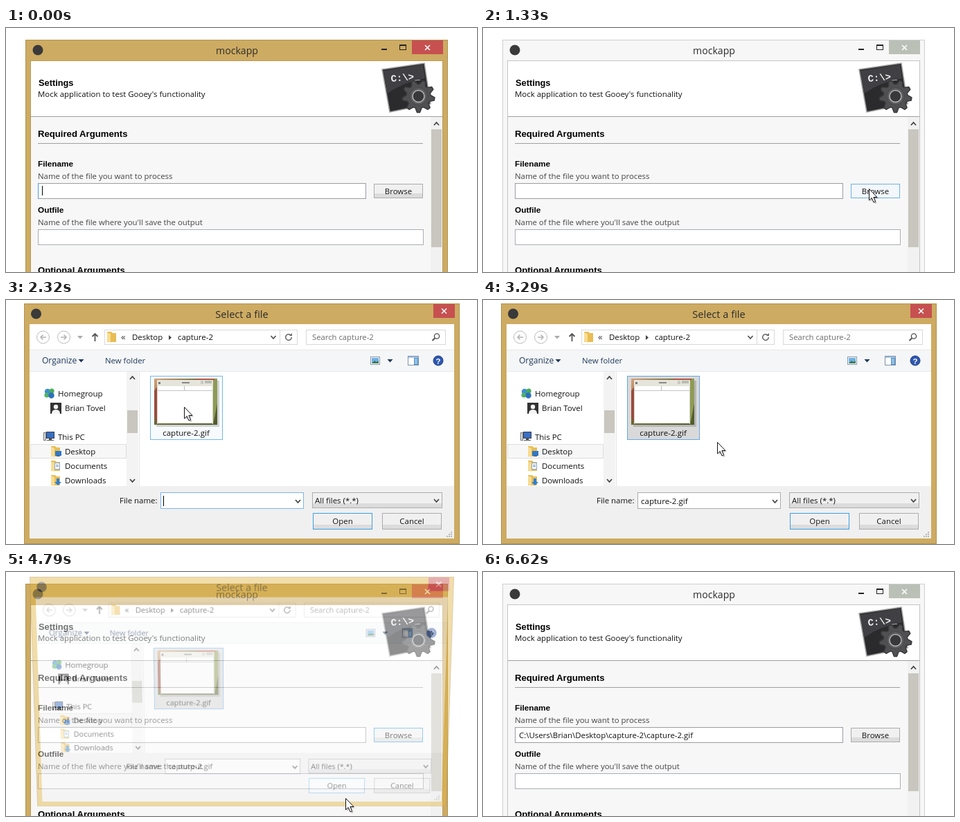
Animation of 680 by 354 pixels, one loop 6750 ms. Source, as an HTML page:

```html
<!DOCTYPE html>
<html lang="en">
<head>
<meta charset="utf-8">
<title>File chooser demo</title>
<style>
html, body { margin: 0; width: 100%; height: 100%; overflow: hidden; background: #fff; }
svg { position: absolute; left: 0; top: 0; width: 680px; height: 354px; overflow: hidden; }
text { font-family: "Open Sans", "Noto Sans", sans-serif; white-space: pre; }
.b { font-family: "Liberation Sans", Arial, sans-serif; font-weight: 700; }
.m { font-family: "Liberation Mono", monospace; font-weight: 700; }
#dialog { transform-origin: 340.5px 0; }
</style>
</head>
<body>
<svg id="app" viewBox="0 0 680 354"></svg>
<svg id="dialog" viewBox="0 0 680 354"></svg>
<svg id="top" viewBox="0 0 680 354"></svg>
<script>
const LOOP = 6750;
const GOLD = [205, 171, 98], FLASH = [224, 182, 69];
const $ = id => document.getElementById(id);

// ---- drawing helpers ----
const fill = (x, y, w, h, c, id = '') =>
  `<rect ${id && `id="${id}"`} x="${x}" y="${y}" width="${w}" height="${h}" fill="${c}"/>`;
const box = (x, y, w, h, c, line, id = '') =>
  `<rect ${id && `id="${id}"`} x="${x + .5}" y="${y + .5}" width="${w - 1}" height="${h - 1}" fill="${c}" stroke="${line}"/>`;
const label = (x, y, s, size = 11.45, more = 'fill="#111"') =>
  `<text x="${x}" y="${y}" font-size="${size}" ${more}>${s}</text>`;
const mid = 'fill="#111" text-anchor="middle"';
const line = (d, c, w = 1, more = '') =>
  `<path d="${d}" fill="none" stroke="${c}" stroke-width="${w}" ${more}/>`;
const shape = (d, c) => `<path d="${d}" fill="${c}"/>`;
const disc = (x, y, r, c, more = '') => `<circle cx="${x}" cy="${y}" r="${r}" fill="${c}" ${more}/>`;
const chevron = (x, y, dir = 1, c = '#444') =>
  line(`M${x - 3.5} ${y - 2 * dir}L${x} ${y + 2 * dir}L${x + 3.5} ${y - 2 * dir}`, c, 1.8);
const triangle = (x, y, c) => shape(`M${x - 4} ${y - 2}h8l-4 4.5z`, c);
const cross = (x, y) => line(`M${x - 3.5} ${y - 3.5}l7 7m0 -7l-7 7`, '#fff', 1.6);

function button(id, x, y, w, h, s) {
  return box(x, y, w, h, '#f0f0f0', '#acacac', id) +
    fill(x + 1, y + h - 7, w - 2, 6, '#dcdcdc', id + 'Band') +
    label(x + w / 2, y + h / 2 + 4.3, s, 11.45, mid);
}
const LOOKS = {
  normal: ['#f0f0f0', '#acacac', 1], focus: ['#f0f0f0', '#3c9fe0', 1],
  hover: ['#f3f7fb', '#6fb0e6', 0], press: ['#cfe5f8', '#569de5', 0]
};
function style(id, look) {
  const [bg, edge, band] = LOOKS[look];
  $(id).setAttribute('fill', bg);
  $(id).setAttribute('stroke', edge);
  $(id + 'Band').setAttribute('opacity', band);
}
const show = (id, on) => $(id).setAttribute('visibility', on ? 'visible' : 'hidden');
const paint = (id, key, v) => $(id).setAttribute(key, v);

// ---- console and gear picture ----
function gear(cx, cy) {
  let pts = [];
  for (let i = 0; i < 36; i++) {
    const a = (i + .5) / 36 * Math.PI * 2, r = i % 4 < 2 ? 23.5 : 17.5;
    pts.push((cx + r * Math.cos(a)).toFixed(1) + ',' + (cy + r * Math.sin(a)).toFixed(1));
  }
  return `<polygon points="${pts.join(' ')}" fill="#505052" stroke="#39393b" stroke-width="1.5" stroke-linejoin="round"/>` +
    disc(cx, cy, 12.5, '#5e5e60', 'stroke="#444"') + disc(cx, cy, 8.5, '#38383a', 'stroke="#b5b5b5" stroke-width="1.5"');
}
const consolePic =
  '<path d="M543 60L604 51L613 110L554 122Z" fill="#2b2b2d" stroke="#a4a4a4" stroke-width="1.6" stroke-linejoin="round"/>' +
  shape('M545 62L602 53L605 73Q575 78 550 95Z', '#404044') +
  `<g transform="rotate(-5 556 78)">${label(556, 78, 'C:\\&gt;_', 14, 'class="m" fill="#f2f2f2"')}</g>` +
  gear(595.5, 99);

// ---- settings window ----
$('app').innerHTML =
  box(28, 17, 610, 360, '#cdab62', '#b3924e', 'frame') +
  box(35, 47, 596, 340, '#f7f7f7', '#b99a58', 'inner') +
  fill(36, 48, 594, 80, '#fff') + fill(36, 128, 594, 1, '#a0a0a0') +
  disc(46, 32, 7.5, '#3a3a3a') +
  label(333.5, 38, 'mockapp', 14.1, 'fill="#2b2b2b" text-anchor="middle"') +
  fill(542, 30, 8, 2, '#222') +
  box(568, 24, 10, 8, 'none', '#222') + fill(568, 24, 10, 2, '#222') +
  fill(586, 18, 45, 20, '#c75050', 'close') + cross(608.5, 28.5) +
  label(47, 84, 'Settings', 12.8, 'class="b"') +
  label(46, 100, "Mock application to test Gooey's functionality") + consolePic +
  label(46, 158, 'Required Arguments', 13.15, 'class="b"') + fill(46, 167, 556, 1, '#a0a0a0') +
  label(46, 201, 'Filename', 11.8, 'class="b"') +
  label(46, 219, 'Name of the file you want to process', 11.4, 'fill="#444"') +
  box(46, 225, 474, 23, '#fff', '#9a9da3') + fill(46, 225, 1, 23, '#4a9ce0', 'edge') +
  fill(52, 229, 1, 14, '#000', 'caret') +
  label(52, 240.5, 'C:\\Users\\Brian\\Desktop\\capture-2\\capture-2.gif', 11.4, 'id="path" fill="#111"') +
  button('browse', 531, 226, 71, 21, 'Browse') +
  label(46, 268, 'Outfile', 11.8, 'class="b"') +
  label(46, 286, "Name of the file where you'll save the output", 11.4, 'fill="#444"') +
  box(46, 292, 557, 23, '#fff', '#abadb3') +
  label(46, 356, 'Optional Arguments', 13.15, 'class="b"') +
  fill(613, 129, 17, 225, '#f1f1f1') + fill(614, 147, 15, 171, '#c8c6be') + chevron(621.5, 139, -1);

// ---- file dialog ----
const folder = (x, y) => shape(`M${x} ${y}h6l2 2h5v13h-13z`, '#e9bd55') + shape(`M${x} ${y + 1}l5 2v13l-5 -2z`, '#f7dd93');
const tools = 'fill="#1e395b"';
function thumb() {
  return fill(217, 117, 91, 67, '#000" opacity=".16') +
    fill(214, 114, 91, 67, 'url(#leaf)') +
    shape('M299 181L305 150V114H290Z', '#8f9a55') + shape('M214 132l5 -7v56l-5 -12z', '#9a4b3c') +
    shape('M272 114h30l-8 9z', '#b3563f') +
    fill(218, 116, 81, 9, '#e6e5dc') + fill(218, 125, 81, 54, '#fff') +
    fill(220, 119, 3, 3, '#777') + fill(254, 119, 11, 2, '#888') + fill(281, 117, 4, 5, '#c9c9c4') +
    fill(287, 117, 10, 4, '#b9bdb4') + fill(218, 131, 81, 1, '#c4c4c4') + fill(257, 125, 1, 6, '#bbb') +
    fill(218, 125, 1, 55, '#d5d5cc') + fill(298, 125, 1, 55, '#d5d5cc');
}
function tree() {
  return disc(60, 133, 4.2, '#3d8fd0') + disc(66, 132, 3.6, '#46ad57') + disc(59, 138, 3.6, '#4fb363') + disc(65.5, 138.5, 4.2, '#2f70bb') +
    label(75, 140, 'Homegroup', 11.55) +
    fill(64, 149, 16, 16, '#333') + disc(72, 155, 3.2, '#f4f4f4') + shape('M66 165q0 -6 6 -6t6 6z', '#f4f4f4') +
    label(85, 161, 'Brian Tovel') +
    box(58, 191, 12, 10, '#3a6fc0', '#333e55') + fill(62, 201, 4, 2, '#555') + fill(59, 203, 10, 1, '#555') + box(54, 192, 4, 12, '#d8dce4', '#777') +
    label(75, 203, 'This PC') +
    box(35, 209, 139, 21, '#f7f7f7', '#dedede') +
    folder(65, 212) + fill(71, 219, 9, 7, '#3179c6') + fill(73, 226, 5, 1, '#555') + label(85, 224, 'Desktop') +
    folder(65, 233) + box(70, 236, 8, 10, '#fff', '#88a4c4') + line('M72 239.5h4m-4 2h4', '#6f94c0') + label(85, 245, 'Documents') +
    folder(65, 254) + shape('M73 259h4v5h3l-5 5l-5 -5h3z', '#2d7fd3') + label(85, 266, 'Downloads');
}
$('dialog').innerHTML =
  '<defs><linearGradient id="leaf" x2="1" y2="1"><stop offset="0" stop-color="#d9a077"/><stop offset=".4" stop-color="#6d6c35"/>' +
  '<stop offset="1" stop-color="#4e5a2a"/></linearGradient></defs>' +
  box(26, 5, 629, 349, '#cdab62', '#b3924e', 'gold') +
  fill(34, 35, 613, 311, '#fff') +
  disc(43.5, 20, 7.5, '#3a3a3a') +
  label(340.5, 26, 'Select a file', 14.6, 'fill="#2b2b2b" text-anchor="middle"') +
  fill(617, 6, 31, 20, '#c75050') + cross(632.5, 16) +
  // address row
  [53.5, 83.5].map(x => disc(x, 54, 9, '#fff', 'stroke="#bbb"')).join('') +
  line('M58 54h-8m3.5 -3.5l-3.5 3.5l3.5 3.5M79 54h8m-3.5 -3.5l3.5 3.5l-3.5 3.5', '#b4b4b4', 1.6) +
  triangle(107, 54, '#aaa') + line('M128.500 60v-11m-4 4l4 -4l4 4', '#555', 1.8) +
  box(142, 43, 279, 22, '#fff', '#d9d9d9') + folder(146, 46) +
  label(166, 58, '«', 13, 'fill="#333"') + label(182, 58, 'Desktop') + shape('M235 51l4 3.500l-4 3.500z', '#444') +
  label(248, 58, 'capture-2') + chevron(386, 54, 1, '#555') + fill(395, 44, 1, 20, '#d9d9d9') +
  line('M411 51a4.300 4.300 0 1 0 1.300 3', '#666', 1.5) + shape('M409 52h4v-4z', '#666') +
  box(433, 43, 202, 22, '#fff', '#d9d9d9') + label(442, 58, 'Search capture-2', 11.3, 'fill="#6d6d6d"') +
  disc(622, 52.500, 3.6, 'none', 'stroke="#555" stroke-width="1.4"') + line('M619.500 55l-4 4', '#555', 1.9) +
  // tool row
  fill(34, 72, 613, 32, '#f5f6f7') + fill(34, 72, 613, 1, '#e6e8ea') + fill(34, 103, 613, 1, '#e6e8ea') +
  label(52, 92, 'Organize', 12, tools) + triangle(108.500, 88, '#1e395b') + label(143, 92, 'New folder', 11.4, tools) +
  box(526, 82, 14, 12, '#fff', '#8a97a8') + fill(528, 84, 10, 8, '#6fb0e4') + shape('M528 92l4 -4l3 2l3 -2v4z', '#3c7a52') +
  triangle(554.500, 88, '#1e395b') +
  box(580, 81, 16, 14, '#fff', '#7c93ae') + fill(581, 82, 14, 2, '#a8c4e2') + box(589, 84, 6, 10, '#8fc0ea', '#5b8fc4') +
  disc(624, 88, 7, '#2c57b0', 'stroke="#1d3c85"') + label(624, 92.500, '?', 11.500, 'class="b" fill="#fff" text-anchor="middle"') +
  // folder tree and files
  tree() +
  fill(174, 104, 17, 166, '#f3f3f3') + fill(175, 160, 15, 33, '#c8c6be') + chevron(182.500, 113, -1) + chevron(182.500, 262) +
  fill(192, 104, 1, 166, '#e4e4e4') +
  box(208, 110, 105, 93, '#f8fbfe', '#76b9ea', 'item') + thumb() + label(260, 197, 'capture-2.gif', 11.55, mid) +
  // bottom row
  fill(34, 270, 613, 76, '#f0f0f0') +
  label(164, 295, 'File name:') +
  box(223, 279, 207, 24, '#fff', '#7eb4ea', 'name') + fill(227, 284, 1, 15, '#000', 'bar') +
  label(228, 295.500, 'capture-2.gif', 11.55, 'id="chosen" fill="#111"') + chevron(421.500, 292) +
  box(442, 279, 188, 23, '#f0f0f0', '#acacac', 'kind') + fill(443, 295, 186, 6, '#dcdcdc', 'kindBand') +
  label(446, 295, 'All files (*.*)') + chevron(621.500, 291) +
  button('open', 443, 309, 86, 24, 'Open') + button('cancel', 543, 309, 86, 24, 'Cancel') +
  [[642, 336], [639, 339], [642, 339], [636, 342], [639, 342], [642, 342]].map(p => fill(p[0], p[1], 2, 2, '#b8b8b8')).join('');

// ---- pointer ----
const arrow = 'M.5 .5V17L4.200 13.500L7 20L9.600 18.900L6.900 12.500H12Z';
$('top').innerHTML = `<g id="pointer"><path d="${arrow}" transform="translate(2 2)" opacity=".22"/>` +
  `<path d="${arrow}" fill="#fff" stroke="#111" stroke-linejoin="round"/></g>`;

// Each move: start, end, number of steps, three points of a curve.
const MOVES = [
  [460, 820, 7, [683, 249], [610, 243], [557, 233]],
  [1770, 2320, 9, [557, 233], [400, 205], [257, 155]],
  [3040, 3710, 11, [257, 155], [400, 240], [490, 328]],
  [5970, 6030, 2, [490, 328], [502, 342], [515, 358]]
];
function pointerAt(t) {
  let pos = [700, 250];
  for (const [t0, t1, n, a, b, c] of MOVES) {
    if (t < t0) break;
    const k = Math.floor((t - t0) * (n - 1) / (t1 - t0) + 1e-6);
    const p = Math.min(1, (k + 1) / n), u = p * p * (3 - 2 * p), v = 1 - u;
    pos = a.map((_, i) => v * v * a[i] + 2 * u * v * b[i] + u * u * c[i]);
  }
  return pos.map(Math.round);
}

// 0 = dialog hidden, 1 = fully open; advances in 60 ms steps
function openness(t) {
  const up = Math.floor((t - 1330) / 60) / 4, down = Math.floor((t - 4610) / 60) / 4;
  return Math.max(0, Math.min(1, up, 1 - down));
}

function drawDialog(u) {
  const el = $('dialog'), q = Math.pow(2 * (1 - u), 1.6);
  el.style.visibility = u > 0 ? 'visible' : 'hidden';
  el.style.opacity = 1 - Math.pow(1 - u, 2.2);
  el.style.transform = q ? `matrix3d(${1 - .013 * q},0,0,0,0,${1 - .0034 * q},0,${(.000057 * q).toFixed(7)},0,0,1,0,0,${q},0,1)` : 'none';
  const mix = Math.min(1, q);
  paint('gold', 'fill', `rgb(${GOLD.map((g, i) => Math.round(g + (FLASH[i] - g) * mix))})`);
}

function draw(t) {
  const [x, y] = pointerAt(t);
  const over = (l, tp, w, h) => x >= l && x < l + w && y >= tp && y < tp + h;
  paint('pointer', 'transform', `translate(${x} ${y})`);

  const active = t < 1330 || (t >= 4790 && t < 6620);
  paint('frame', 'fill', active ? '#cdab62' : '#f7f7f7');
  paint('frame', 'stroke', active ? '#b3924e' : '#cfcfcf');
  paint('inner', 'stroke', active ? '#b99a58' : '#c4c4c4');
  paint('close', 'fill', active ? '#c75050' : '#bac0b6');
  show('edge', t < 1140);
  show('caret', t < 520 || (t >= 1020 && t < 1140));
  show('path', t >= 4850);
  style('browse', t < 1140 ? (over(531, 226, 71, 21) ? 'hover' : 'normal')
    : t < 1270 ? 'press' : t < 4790 ? 'hover' : t < 6620 ? 'focus' : 'normal');

  drawDialog(openness(t));
  const picked = t >= 2780;
  show('item', picked || over(208, 110, 105, 93));
  paint('item', 'fill', picked ? '#d9d9d9' : '#f8fbfe');
  paint('item', 'stroke', picked ? '#66a7e8' : '#76b9ea');
  show('bar', t < 1770 || (t >= 2320 && !picked));
  show('chosen', picked);
  paint('name', 'stroke', !picked || over(223, 279, 207, 24) ? '#7eb4ea' : '#acacac');
  style('kind', over(442, 279, 188, 23) ? 'hover' : 'normal');
  style('open', !over(443, 309, 86, 24) ? 'focus' : t >= 4530 && t < 4610 ? 'press' : 'hover');
}

let start = null;
function tick(now) {
  if (start === null) start = now;
  draw((now - start) % LOOP);
  requestAnimationFrame(tick);
}
draw(0);
requestAnimationFrame(tick);
</script>
</body>
</html>
```
